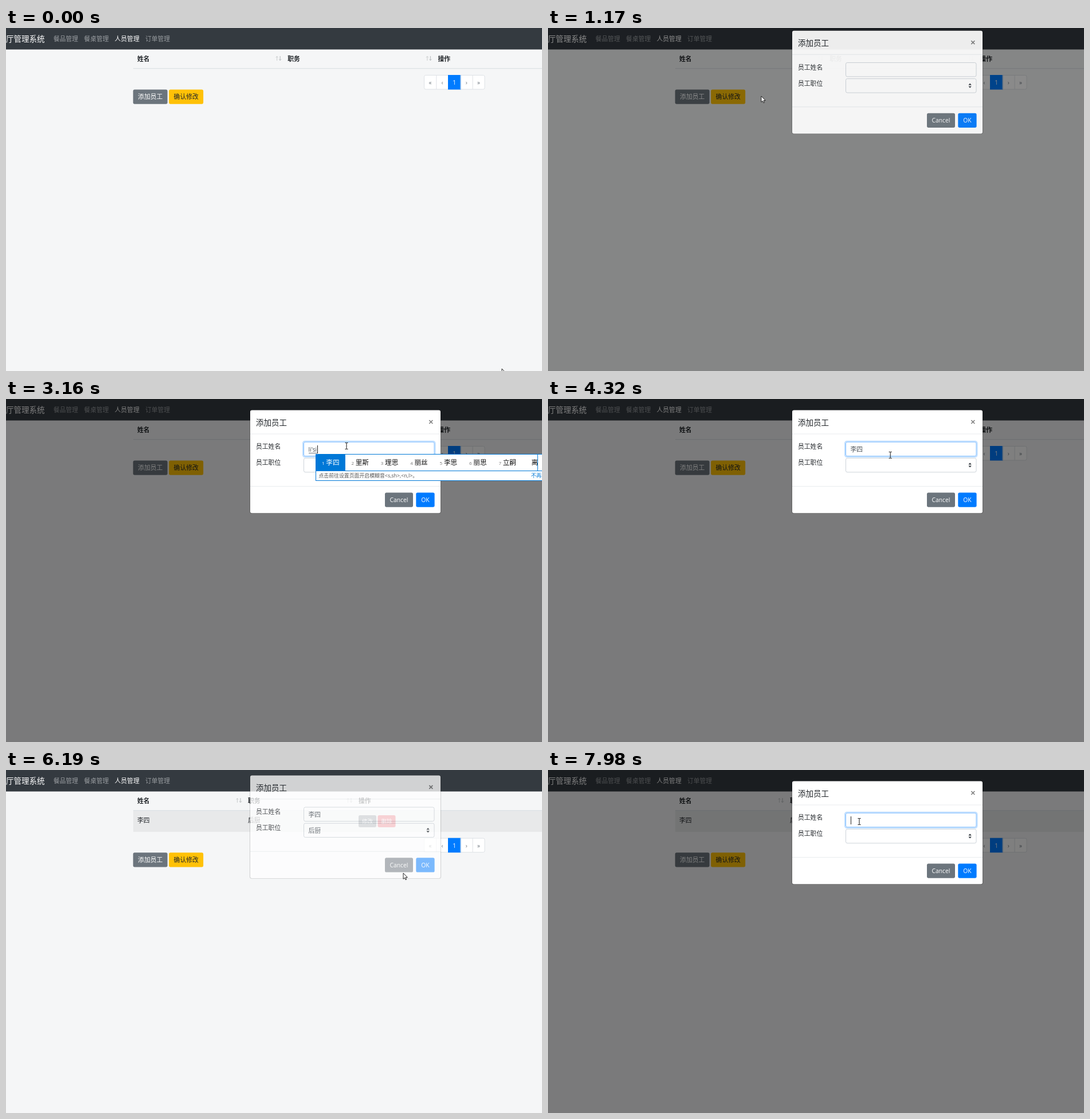
Recreate the animation shown at these times as an HTML page. Size 935 by 599 pixels, loop 8000 ms.

```html
<!DOCTYPE html>
<html lang="zh-CN">
<head>
<meta charset="utf-8">
<title>员工管理</title>
<style>
html, body { margin: 0; width: 100%; height: 100%; overflow: hidden; background: #f5f6f7; }
svg { display: block; font-family: "Open Sans", "Noto Sans CJK SC", "Noto Sans CJK JP", sans-serif; }
text { white-space: pre; }
</style>
</head>
<body>
<svg id="stage" width="935" height="599" viewBox="0 0 935 599"></svg>
<script>
const LOOP = 8000, BLINK = 535;
const INK = '#212529', GRAY = '#6c757d', BLUE = '#007bff', IME_BLUE = '#0078d7', LINE = '#dee2e6', INPUT = '#495057';

// Moments of the story, in ms
const T = { open: 1033, focus: 1775, type: 2540, commit: 3390, list: 4470, pick: 5500, close: 6157, reopen: 7314, refocus: 7815 };

// Pointer stops: [arrival, x, y]; how long each move takes follows from its distance
const STOPS = [
  [0, 865, 595], [680, 263, 118], [1170, 372, 119], [1470, 600, 102], [1930, 594, 82], [4400, 600, 112],
  [5000, 597, 133], [5430, 586, 147], [6050, 726, 175], [6190, 693, 180], [6810, 265, 156],
  [7380, 340, 119], [7780, 543, 90]
];

// Pinyin entry: [time, typed text, candidates]
const TYPING = [
  [T.type, "l", '了里来老路啦拉'],
  [2700, "li", '里离力立丽利理'],
  [3000, "li's", '历史 理事 离散 力士 隶属 梨树 礼数'],
  [3160, "li'si", '李四 里斯 理思 丽丝 李思 丽思 立嗣']
];

const clamp = v => Math.max(0, Math.min(1, v));
const easeOut = v => 1 - (1 - clamp(v)) ** 1.66;
const between = (v, a, b) => v >= a && v < b;
const inside = ([px, py], x, y, w, h) => between(px, x, x + w) && between(py, y, y + h);

const rect = (x, y, w, h, fill, more = '') =>
  `<rect x="${x}" y="${y}" width="${w}" height="${h}" fill="${fill}" ${more}/>`;
const box = (x, y, w, h, fill, stroke, r = 2.7) =>
  rect(x + .5, y + .5, w - 1, h - 1, fill, `stroke="${stroke}" rx="${r}"`);
const ring = (x, y, w, h, color, opacity) =>
  rect(x - 1, y - 1, w + 2, h + 2, 'none', `rx="3.6" stroke="${color}" stroke-width="2.1" opacity="${opacity}"`);
const stroke = (d, color, width = 1) =>
  `<path d="${d}" fill="none" stroke="${color}" stroke-width="${width}"/>`;
const label = (x, mid, s, fill = INK, size = 10.8, more = '') =>
  `<text x="${x}" y="${mid + size * .38}" fill="${fill}" font-size="${size}" ${more}>${s}</text>`;
const centered = (x, mid, s, fill, size) => label(x, mid, s, fill, size, 'text-anchor="middle"');
const button = (x, y, w, h, s, fill, color = '#fff', size = 10.8) =>
  rect(x, y, w, h, fill, 'rx="2.7"') + centered(x + w / 2, y + h / 2, s, color, size);

function pointerAt(t) {
  const next = STOPS.findIndex(stop => stop[0] > t);
  if (next < 0) return STOPS.at(-1).slice(1);
  const [t0, x0, y0] = STOPS[next - 1], [t1, x1, y1] = STOPS[next];
  const duration = Math.min(t1 - t0, 150 + .6 * Math.hypot(x1 - x0, y1 - y0));
  const k = clamp(1 - (t1 - t) / duration);
  return [x0 + (x1 - x0) * k, y0 + (y1 - y0) * k];
}

function navbar() {
  const links = ['餐品管理', '餐桌管理', '人员管理', '订单管理'];
  return rect(0, 0, 935, 37.5, '#343a40') + label(0, 19.3, '厅管理系统', '#fff', 13.5) +
    links.map((s, i) => label(82.7 + i * 53.4, 19, s, i === 2 ? '#fff' : '#999da0')).join('');
}

function table(filled) {
  const pitch = filled ? 193 : 262.2;
  const header = ['姓名', '职务', '操作'].map((s, i) => {
    const x = 229 + i * pitch;
    const sort = i ? stroke(`M${x - 18.5} 57v-7.5m-2 2l2-2l2 2`, '#c9cccd') +
      stroke(`M${x - 13} 49v7.5m-2-2l2 2l2-2`, '#b4b8ba') : '';
    return sort + label(x, 54, s, INK, 10.8, 'font-weight="700"');
  }).join('');
  const row = filled ? rect(222, 71, 713, 37, '#e8e9ea') + label(229, 88, '李四') + label(422, 88, '后厨') +
    button(615, 79, 31, 21, '修改', GRAY, '#fff', 9.4) + button(648.5, 79, 31, 21, '删除', '#dc3545', '#fff', 9.4) : '';
  return header + row + rect(222, 70, 713, 1.35, LINE);
}

function pagination(y) {
  return box(729, y, 106.5, 25.5, '#fff', LINE) + [...'«‹1›»'].map((s, i) => {
    const mid = 782.2 + (i - 2) * 21.1, on = i === 2;
    return (on ? rect(771, y, 22.5, 25.5, BLUE) : i ? stroke(`M${mid - 10.3} ${y}v25`, LINE) : '') +
      centered(mid, y + 13, s, on ? '#fff' : GRAY, 10);
  }).join('');
}

function page(t, at) {
  const filled = t >= T.close, dy = filled ? 36.7 : 0, y = 107.5 + dy;
  const focused = between(t, T.open - 80, T.open + 70) || between(t, T.close + 150, T.reopen + 100);
  return rect(0, 0, 935, 599, '#f5f6f7') + navbar() + table(filled) + pagination(82 + dy) +
    (focused ? ring(221.7, y, 60, 25.3, GRAY, .5) : '') +
    button(221.7, y, 60, 25.3, '添加员工', inside(at, 222, y, 60, 25) ? '#5a6268' : GRAY) +
    button(284.2, y, 60, 25.3, '确认修改', '#ffc107', INK);
}

const field = (y, value, focused) =>
  box(519, y, 228.5, 25.5, '#fff', focused ? '#80bdff' : '#ced4da') + label(527.5, y + 13, value, INPUT);

const typedAt = t => between(t, T.type, T.commit) ? TYPING.findLast(step => t >= step[0]) : null;
const caretFor = typed => 528 + 3 * typed.length;

function nameField(t) {
  const typed = typedAt(t), named = between(t, T.commit, T.reopen);
  const since = [T.focus, T.type, T.commit, T.refocus].findLast(m => t >= m);
  const focused = between(t, T.focus, T.list) || t >= T.refocus;
  const glow = clamp((t - (t < T.list ? T.focus : T.refocus)) / 150);
  let out = (focused ? ring(519, 74.7, 228.5, 25.5, '#bfdeff', glow) : '') + field(74.7, named ? '李四' : '', focused);
  if (typed) out += label(527.5, 88, typed[1], INPUT, 10.3) + stroke(`M528 94.5H${caretFor(typed[1])}`, INPUT, .8);
  const caretOn = typed || (focused && (t - since) % (2 * BLINK) < BLINK);
  return out + (caretOn ? rect(typed ? caretFor(typed[1]) : named ? 550 : 528, 81, 1, 14, '#222') : '');
}

function modal(t, at) {
  const closing = between(t, T.close, T.reopen);
  const age = t - (closing ? T.close : t < T.close ? T.open : T.reopen);
  const alpha = closing ? 1 - clamp(age / 150) : clamp(age / 150);
  if (!alpha) return '';
  const dy = -33.5 * (closing ? easeOut((age + 25) / 300) : 1 - easeOut((age - 21) / 300));
  const job = between(t, T.pick, T.reopen) ? '后厨' : between(t, 4950, T.pick) ? '前台' : '';
  const busy = between(t, T.close - 50, T.reopen);
  const okFill = !busy && inside(at, 715, 163, 33, 26) ? '#0069d9' : BLUE;
  return rect(0, 0, 935, 599, '#000', `opacity="${closing ? 0 : alpha / 2}"`) +
    `<g opacity="${alpha}" transform="translate(0 ${dy})">` +
    rect(425, 19, 334, 181, '#000', 'rx="3.5" opacity=".2"') + rect(426, 19.6, 332, 179.6, '#fff', 'rx="3"') +
    label(436, 41, '添加员工', INK, 13.5) + stroke('M738.3 37l6 6m0-6l-6 6', '#7f7f7f', 1.7) +
    stroke('M426 61H758M426 152.5H758', '#e9ecef') + label(436, 83.3, '员工姓名') + label(436, 111.3, '员工职位') +
    nameField(t) + field(102.8, job, between(t, T.list, T.close - 250)) +
    '<path d="M733.4 114.4l2.7-3.2l2.7 3.2zM733.4 116.4l2.7 3.2l2.7-3.2z" fill="#343a40"/>' +
    `<g opacity="${busy ? .65 : 1}">` + button(661, 163.5, 49, 25.3, 'Cancel', GRAY, '#fff', 10.3) +
    button(715.3, 163.5, 32.3, 25.3, 'OK', okFill, '#fff', 10.3) + '</g></g>';
}

function dropdown(t, at) {
  if (!between(t, T.list, T.pick + 60)) return '';
  return box(519, 128, 228.5, 31, '#fff', '#7fb2e8', 0) + ['前台', '后厨'].map((s, i) => {
    const y = 128.7 + i * 14.8, active = inside(at, 519, y, 228, 14.8);
    return (active ? rect(519.8, y, 227, 14.8, '#1e90ff') : '') + label(527.5, y + 7.6, s, active ? '#fff' : INPUT);
  }).join('');
}

function candidates(t) {
  const typed = typedAt(t);
  if (!typed) return '';
  const [, text, list] = typed, pairs = list.includes(' ');
  const x = caretFor(text) - 3, pitch = pairs ? 51.4 : 39.7, hint = text.length > 1;
  let out = box(x, 96, hint ? 420 : 839 - x, 30, '#fff', IME_BLUE, 0) + rect(x, 96.5, pitch + .5, 29, IME_BLUE);
  list.split(pairs ? ' ' : '').forEach((s, i) => {
    const left = x + 11 + i * pitch;
    out += label(left, 112, i + 1, i ? '#777' : '#fff', 8) + label(left + 7.3, 111, s, i ? '#111' : '#fff', 11.6);
  });
  if (hint) out += (pairs ? label(916.5, 111, '离', '#111', 11.6) : '') + rect(927.5, 97, 8, 28, '#fff') +
    stroke('M927.5 97V125', IME_BLUE) + box(x, 125, 420, 18, '#fff', IME_BLUE, 0) +
    label(x + 5.5, 133.5, '点击前往设置页面开启模糊音&lt;s,sh&gt;,&lt;n,l&gt;。', '#555', 8.9) +
    label(916, 133.5, '不再提示', IME_BLUE, 9);
  return out;
}

function pointer(t, at) {
  const modalOpen = between(t, T.open, T.close) || t >= T.reopen;
  const shape = modalOpen && inside(at, 519, 75, 229, 25)
    ? stroke('M-2.5-5.5h2l.5.5l.5-.5h2M0-5V5M-2.5 5.5h2l.5-.5l.5.5h2', '#111')
    : '<path d="M0 0V10.4L2.4 8.2L4 11.8L5.6 11.1L4.1 7.6H7.3Z" fill="#fff" stroke="#111" stroke-width=".9"/>';
  return `<g transform="translate(${at})">${shape}</g>`;
}

const stage = document.getElementById('stage');
const begin = performance.now();
function frame() {
  const t = (performance.now() - begin) % LOOP, at = pointerAt(t);
  stage.innerHTML = [page, modal, dropdown, candidates, pointer].map(draw => draw(t, at)).join('');
  requestAnimationFrame(frame);
}
frame();
</script>
</body>
</html>
```
